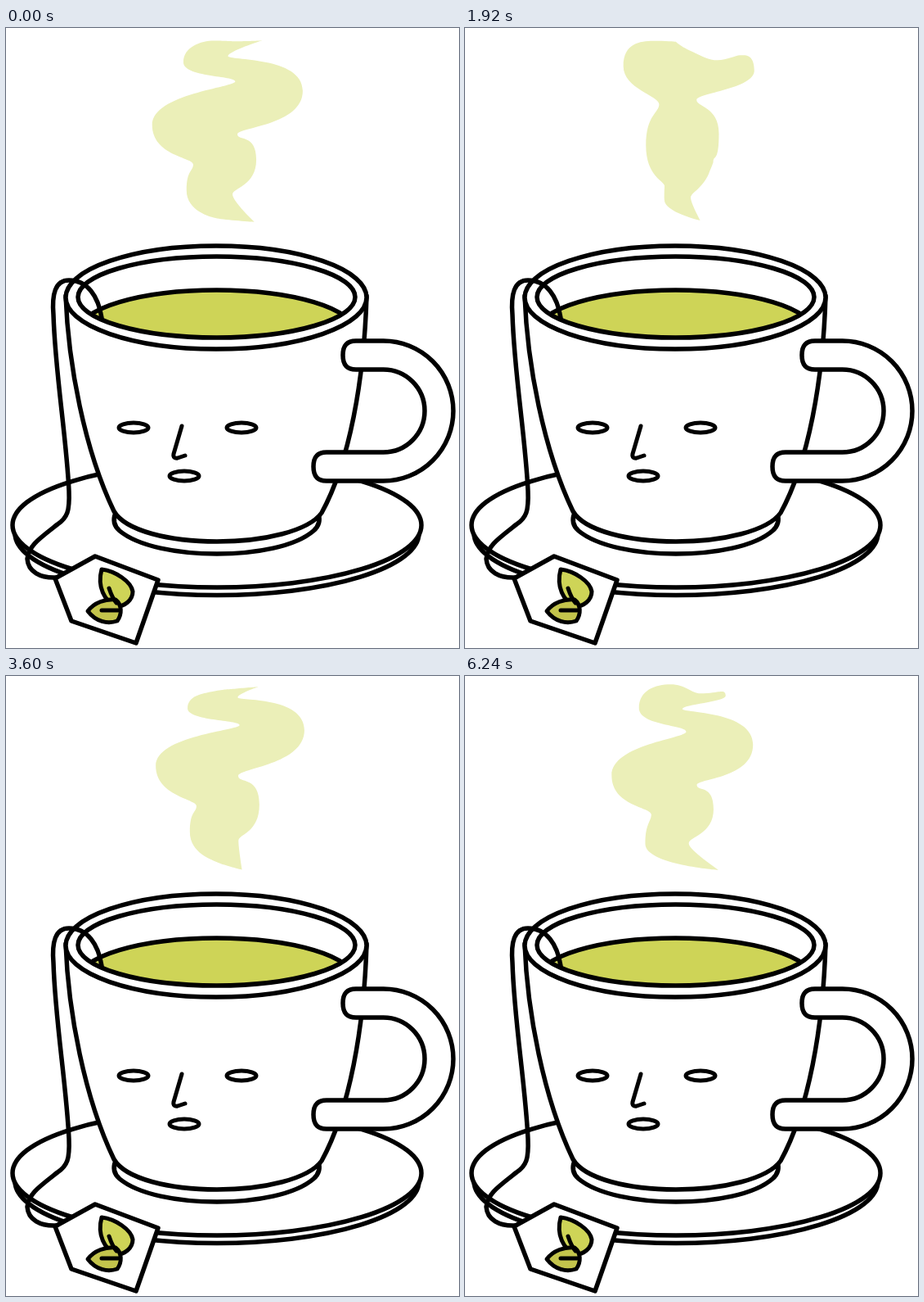
An HTML page with a canvas that plays this animation: 554 px wide and 757 px high, repeating every 6270 ms.

```html
<!DOCTYPE html>
<html lang="en">
<head>
<meta charset="utf-8">
<title>Cup of tea</title>
<style>
  html, body { margin: 0; width: 100%; height: 100%; overflow: hidden; background: #fff; }
  canvas { display: block; }
</style>
</head>
<body>
<canvas id="stage" width="554" height="757"></canvas>
<script>
const ctx = document.getElementById('stage').getContext('2d');
const LOOP = 6270, CYCLE = 3270, LEAD = 120;
const STEAM = '#ebefb8', TEA = '#ced457', SHADE = '#c3c44c', INK = '#000', PAPER = '#fff';
const TAU = Math.PI * 2;

// Every curl of steam climbs the same path, one cycle behind the curl above it.
// A path starts at beat `start`; there are four beats to a cycle.
const BEATS = [0, 1320, 2250, 2730];
const path = (start, round, text) =>
  ({ start, round, pts: text.split(' ').map(p => p.split(',').map(Number)) });

const leftLobe = path(1, 0.75, '257,226 239,206 226,210 220,201 234,168 215,136 190,118 178,121 197,80 194,38 208,30 215,42 238,29 266,17');
const leftNeck = path(0, 0.22, '258,234 260,212 239,186 231,166 228,169 243,130 237,83 249,69 278,67 287,42 250,11');
const leftCrest = path(9, 0.5, '235,44 230,8 242,2 254,14 254,25 285,30');
const rightLobe = path(1, 0.9, '284,212 302,168 303,162 305,162 318,143 310,122 325,93 361,80 360,44 350,54 330,46 315,17 300,15');
const rightNeck = path(1, 0.22, '267,228 278,202 275,203 275,204 303,190 302,152 288,134 283,132 287,100 281,82 270,50 268,37 318,12 338,39 325,37 307,13');
const shoulder = path(0, 0.4, '285,17 282,21 314,43 298,35');
const foot0 = path(0, 0, '308,237 255,235 298,235 307,236');

const beatTime = n => BEATS[n & 3] + CYCLE * (n >> 2);

// Position on a path at a time, or null before its birth and after its end.
function at(p, time, looped) {
  let n = Math.floor(time / CYCLE) * 4 + 3;
  while (beatTime(n) > time) n--;
  const i = n - p.start, last = p.pts.length - 1;
  if (!looped && (i < 0 || i >= last)) return null;
  const [a, b, c, d] = [-1, 0, 1, 2].map(o =>
    p.pts[looped ? (i + o) & 3 : Math.max(0, Math.min(last, i + o))]);
  const [t0, t1, t2, t3] = [-1, 0, 1, 2].map(o => beatTime(n + o));
  const span = t2 - t1, s = (time - t1) / span, q = 1 - s;
  const [x, y] = [0, 1].map(j => b[j] + (c[j] - b[j]) * s * s * (3 - 2 * s)
    + s * q * q * span / (t2 - t0) * (c[j] - a[j])
    - s * s * q * span / (t3 - t1) * (d[j] - b[j]));
  return { x, y, round: p.round };
}

function steamNodes(phase) {
  const tip = at(foot0, phase, true), left = [], right = [];
  for (let g = 0; g < 5; g++) {
    const t = phase + g * CYCLE;
    for (const p of [leftLobe, leftCrest, leftNeck]) left.push(at(p, t));
    for (const p of [rightNeck, rightLobe]) right.unshift(at(p, t));
  }
  return [tip, ...left, at(shoulder, phase, true), ...right, tip].filter(Boolean);
}

// Flat at turning points, otherwise the harmonic mean of both neighbours.
const slope = (a, b) => a * b > 0 ? 2 * a * b / (a + b) : 0;

function drawSteam(phase) {
  const nodes = steamNodes(phase);
  const handle = nodes.map((b, i) => {
    const a = nodes[i - 1] || b, c = nodes[i + 1] || b;
    return [slope(b.x - a.x, c.x - b.x) * b.round, slope(b.y - a.y, c.y - b.y) * b.round];
  });
  ctx.beginPath();
  ctx.moveTo(nodes[0].x, nodes[0].y);
  for (let i = 1; i < nodes.length; i++) {
    const a = nodes[i - 1], b = nodes[i], h = handle[i - 1], k = handle[i];
    ctx.bezierCurveTo(a.x + h[0], a.y + h[1], b.x - k[0], b.y - k[1], b.x, b.y);
  }
  ctx.fillStyle = STEAM;
  ctx.fill();
}

const curve = d => new Path2D(d);
function oval(x, y, rx, ry) {
  const p = new Path2D();
  p.ellipse(x, y, rx, ry, 0, 0, TAU);
  return p;
}
function ink(shape, fill, width = 5.5) {
  if (fill) { ctx.fillStyle = fill; ctx.fill(shape); }
  ctx.strokeStyle = INK;
  ctx.lineWidth = width;
  ctx.stroke(shape);
}

const saucerEdge = oval(258, 617, 247, 75.5);
const saucer = oval(258, 607, 250, 76);
const foot = curve('M134 592C131 599 131 607 139 614C162 633 210 642 258 642C306 642 354 633 376 614C384 607 384 599 382 593');
const body = curve('M73 327C76 410 96 515 132 590C146 614 200 627 258 627C316 627 370 614 386 592C420 530 438 430 441 327');
const rim = oval(257, 329, 184, 63);
const opening = oval(257.5, 328.5, 169.5, 49.5);
const tea = oval(257.5, 370, 168, 50);
const handle = curve('M428 382H461.5A85.5 85.5 0 0 1 461.5 553H392C380 553 376 546 376 535.5S380 518 392 518H461.5A50.5 50.5 0 0 0 461.5 417H428C416 417 412 410 412 399.5S416 382 428 382Z');
const string = curve('M117 354C113 328 100 308 77 308C60 308 56 325 58 350C60 420 74 500 77 565C78 590 75 598 63 606C40 624 28 632 26 648C27 664 42 672 62 671');
const tag = curve('M109 645L186 674L159 751L80 724L60 672Z');
const leaf = curve('M117 661C134 663 153 676 155 688C155 699 145 706 134 707C121 699 111 683 117 661Z');
const lowLeaf = curve('M100 712C108 701 122 697 134 698C142 704 142 716 136 724C124 728 110 725 100 712Z');
const veins = curve('M126 684Q130 696 135 702M117 711H137');
const nose = curve('M215 486L205 520Q204 526 210 525L219 522');

function drawCup() {
  ctx.lineCap = ctx.lineJoin = 'round';
  for (const shape of [saucerEdge, saucer, foot, body, rim]) ink(shape, PAPER);

  ctx.save();
  ctx.clip(opening);
  ink(tea, TEA);
  ctx.restore();
  ink(opening);
  ink(handle, PAPER);

  for (const [x, y] of [[156, 488], [288, 488], [218, 547]]) ink(oval(x, y, 18, 6), PAPER, 5);
  ink(nose, null, 5);

  ink(string);
  ink(tag, PAPER);
  ink(leaf, TEA, 5);
  ink(lowLeaf, SHADE, 5);
  ink(veins, null, 5);
}

function frame() {
  const phase = (performance.now() % LOOP + LEAD) % CYCLE;
  ctx.fillStyle = PAPER;
  ctx.fillRect(0, 0, 554, 757);
  drawSteam(phase);
  drawCup();
  requestAnimationFrame(frame);
}
frame();
</script>
</body>
</html>
```
